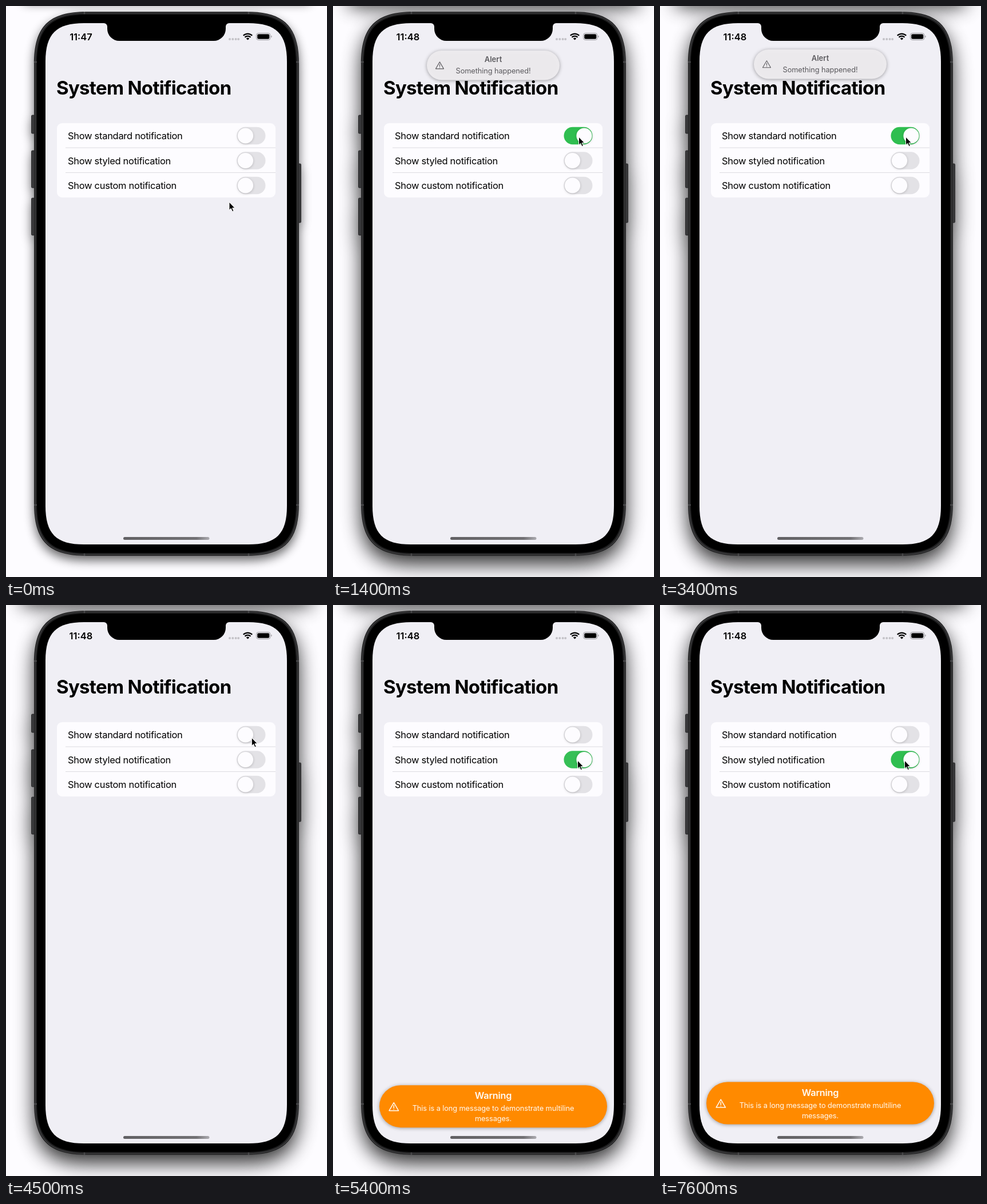
An HTML page that plays this animation: 561x999 px, repeating every 8 s.

```html
<!DOCTYPE html>
<html lang="en">
<head>
<meta charset="utf-8">
<title>System Notification</title>
<style>
  html, body { margin: 0; width: 100%; height: 100%; overflow: hidden; background: #fdfcff; }
  svg { display: block; width: 100%; height: 100%; }
  text { font-family: Inter, Roboto, sans-serif; }
  .title { font-size: 33px; font-weight: 700; letter-spacing: -.7px; }
  .row { font-size: 16.5px; letter-spacing: -.3px; }
  .clock { font-size: 16.5px; font-weight: 600; }
  .small { font-size: 12.8px; letter-spacing: -.1px; }
  .centered { text-anchor: middle; }
  .card { filter: drop-shadow(0 1px 3px rgba(0, 0, 0, .36)); }
</style>
</head>
<body>
<svg viewBox="0 0 561 999" xmlns="http://www.w3.org/2000/svg">
  <defs>
    <clipPath id="screenClip"><path data-box="69 30 422 912 52.6"/></clipPath>
    <linearGradient id="homeBar">
      <stop offset="0" stop-color="#626164"/>
      <stop offset=".85" stop-color="#727174"/>
      <stop offset="1" stop-color="#adacb1"/>
    </linearGradient>
    <g id="warningSign" fill="none" stroke="currentColor" stroke-linecap="round" stroke-linejoin="round">
      <path d="M0-6.2 7 5.8H-7Z"/>
      <path d="M0-2V1.8M0 3.8V3.9"/>
    </g>
    <g id="buttons">
      <rect x="44.5" y="191" width="6" height="32" rx="1.5"/>
      <rect x="44.5" y="253" width="6" height="65" rx="1.5"/>
      <rect x="44.5" y="336" width="6" height="65" rx="1.5"/>
      <rect x="509.5" y="276" width="6" height="103" rx="1.5"/>
    </g>
  </defs>

  <!-- Shadows of the phone and of the window bar above the stage -->
  <rect class="shadow" x="28" y="-90" width="505" height="77" rx="10"/>
  <g class="shadow">
    <path data-box="49 10 463 952 72"/>
    <use href="#buttons"/>
  </g>

  <!-- Phone body -->
  <use href="#buttons" fill="#3a3a3c" stroke="#1b1b1c" stroke-width=".8"/>
  <path data-box="49 10 463 952 72" fill="#202021"/>
  <path data-box="51 12 459 948 70" fill="none" stroke="#3c3c3e" stroke-width="1.6"/>
  <path d="M49 98h5M507 98h5M49 873h5M507 873h5M137 10v4M424 10v4M137 958v4M424 958v4" stroke="#48484a" stroke-width="2.5"/>
  <path data-box="54 15 453 942 67.6"/>

  <g clip-path="url(#screenClip)">
    <rect x="69" y="30" width="422" height="912" fill="#f0eff5"/>
    <text class="title" x="88" y="155">System Notification</text>
    <rect x="89" y="205" width="382" height="130" rx="9" fill="#fdfcff"/>
    <path d="M104 248H471M104 291.5H471" stroke="#dcdbe0"/>
    <g id="rows"></g>

    <g id="alertCard">
      <rect class="card" x="164" y="76" width="232" height="51.5" rx="25.75" fill="#edebee" fill-opacity=".98"/>
      <g fill="#5b5a5e" color="#5b5a5e">
        <use href="#warningSign" x="186.5" y="102" stroke-width="1.1"/>
        <text class="centered" x="280" y="96" font-size="13" font-weight="600">Alert</text>
        <text class="small centered" x="280" y="116.3">Something happened!</text>
      </g>
    </g>

    <g id="warningCard">
      <rect class="card" x="81" y="834.5" width="398" height="74" rx="37" fill="#ff8a00"/>
      <g fill="#fffaf3" color="#fffaf3">
        <use href="#warningSign" transform="translate(106.3 872.3) scale(1.17)" stroke-width="1.3"/>
        <text class="centered" x="280" y="858.7" font-size="16.3" font-weight="600" letter-spacing="-.25">Warning</text>
        <text class="small centered" x="280" y="879.5">This is a long message to demonstrate multiline</text>
        <text class="small centered" x="280" y="897.5">messages.</text>
      </g>
    </g>
    <rect x="205" y="929" width="150.5" height="5" rx="2.5" fill="url(#homeBar)"/>
  </g>

  <!-- Notch and status bar -->
  <path d="M171 29v1a6 6 0 0 1 6 6v4a21 21 0 0 0 21 21h165a21 21 0 0 0 21-21v-4a6 6 0 0 1 6-6v-1z"/>
  <text id="clock" class="clock centered" x="131" y="59.5"></text>
  <path d="M391 58h.01M396.3 58h.01M401.6 58h.01M406.2 58h.01" stroke="#c3c2c7" stroke-width="4" stroke-linecap="round"/>
  <g fill="none" stroke="#000" stroke-width="2.3">
    <path d="M414.8 51.8a10.8 10.8 0 0 1 15.4 0M417.5 54.8a7 7 0 0 1 10 0"/>
    <path d="M422.5 59.6 419.8 56.9a3.8 3.8 0 0 1 5.4 0z" fill="#000" stroke="none"/>
  </g>
  <rect x="437.5" y="47.5" width="24.5" height="12" rx="3.8" fill="none" stroke="#9b9a9f"/>
  <rect x="439.2" y="49.2" width="21.1" height="8.6" rx="2.3"/>
  <path d="M463.3 51.6q1.4.6 1.4 1.9t-1.4 1.9z" fill="#9b9a9f"/>

  <path id="cursor" d="M0 0V14.2L3.2 11.2 5.6 16.6 8 15.6 5.6 10.4H10Z" stroke="#fff" stroke-width="1" stroke-linejoin="round"/>
</svg>

<script>
  const LOOP = 8000;
  const SLIDE = 246;
  const byId = id => document.getElementById(id);
  const clamp = v => Math.min(1, Math.max(0, v));
  const easeOut = p => 1 - (1 - p) ** 2;
  const smooth = p => p * p * (3 - 2 * p);
  const lerp = (a, b, p) => a + (b - a) * p;
  const mixColor = (a, b, p) => `rgb(${a.map((v, i) => lerp(v, b[i], p))})`;

  // Box whose corners bend in gradually, as on the phone's casing and screen.
  function softBox(x, y, w, h, r) {
    const e = 1.28 * r, c = 0.925 * r, d = e - c;
    return `M${x + e} ${y}h${w - 2 * e}c${c} 0 ${e} ${d} ${e} ${e}v${h - 2 * e}c0 ${c} ${-d} ${e} ${-e} ${e}` +
      `h${2 * e - w}c${-c} 0 ${-e} ${-d} ${-e} ${-e}v${2 * e - h}c0 ${-c} ${d} ${-e} ${e} ${-e}z`;
  }
  document.querySelectorAll('[data-box]').forEach(path =>
    path.setAttribute('d', softBox(...path.dataset.box.split(' ').map(Number))));

  // Remaining share of the way for a lightly underdamped spring, from 1 to 0.
  function spring(ms) {
    if (ms <= 0) return 1;
    const s = ms / 1000, omega = 2 * Math.PI / 0.5, damping = 0.825;
    const root = Math.sqrt(1 - damping ** 2), angle = omega * root * s;
    return Math.exp(-damping * omega * s) * (Math.cos(angle) + damping / root * Math.sin(angle));
  }

  const rows = [
    { label: 'Show standard notification', y: 227, on: 1020, off: 3960 },
    { label: 'Show styled notification', y: 270.5, on: 5080, off: Infinity },
    { label: 'Show custom notification', y: 314, on: Infinity, off: Infinity }
  ];
  byId('rows').innerHTML = rows.map(({ label, y }) => `
    <text class="row" x="108" y="${y + 6}">${label}</text>
    <rect class="track" x="403.5" y="${y - 15.3}" width="50" height="30.6" rx="15.3"/>
    <circle class="knob" cy="${y}" r="13.6" fill="#fdfcff" style="filter:drop-shadow(0 1.5px 2px rgba(0,0,0,.2))"/>`).join('');
  const tracks = document.querySelectorAll('.track');
  const knobs = document.querySelectorAll('.knob');
  const shadows = document.querySelectorAll('.shadow');

  // start, end, x, y: the pointer glides to (x, y) within that time.
  const moves = [
    [200, 200, 447, 265.5],
    [440, 600, 429.5, 229],
    [4420, 4900, 427.5, 272]
  ];

  function pointerAt(t) {
    let x = 390, y = 343;
    for (const [start, end, toX, toY] of moves) {
      if (t < start) break;
      const p = end > start ? smooth(clamp((t - start) / (end - start))) : 1;
      x = lerp(x, toX, p);
      y = lerp(y, toY, p);
    }
    return [x, y];
  }

  function draw(t) {
    const [drop, blur, opacity] = t < 900 ? [8, 9, 0.6] : [15, 17, 0.8];
    shadows.forEach(shadow => {
      shadow.style.cssText = `transform:translateY(${drop}px);filter:blur(${blur}px);opacity:${opacity}`;
    });
    byId('clock').textContent = t < 500 ? '11:47' : '11:48';

    rows.forEach(({ on, off }, i) => {
      const progress = time => easeOut(clamp((t - on) / time)) * (1 - easeOut(clamp((t - off) / 130)));
      tracks[i].setAttribute('fill', mixColor([227, 226, 230], [47, 190, 80], progress(400)));
      knobs[i].setAttribute('cx', lerp(418.5, 439, progress(230)));
    });

    const alertOffset = t < 3970 ? spring(t - 1000) : 1 - spring(t - 3970);
    byId('alertCard').setAttribute('transform', `translate(0 ${-SLIDE * alertOffset})`);
    byId('warningCard').setAttribute('transform', `translate(0 ${SLIDE * spring(t - 5090)})`);
    byId('cursor').setAttribute('transform', `translate(${pointerAt(t)})`);
  }

  const begin = performance.now();
  function tick() {
    draw((performance.now() - begin) % LOOP);
    requestAnimationFrame(tick);
  }
  tick();
</script>
</body>
</html>
```
